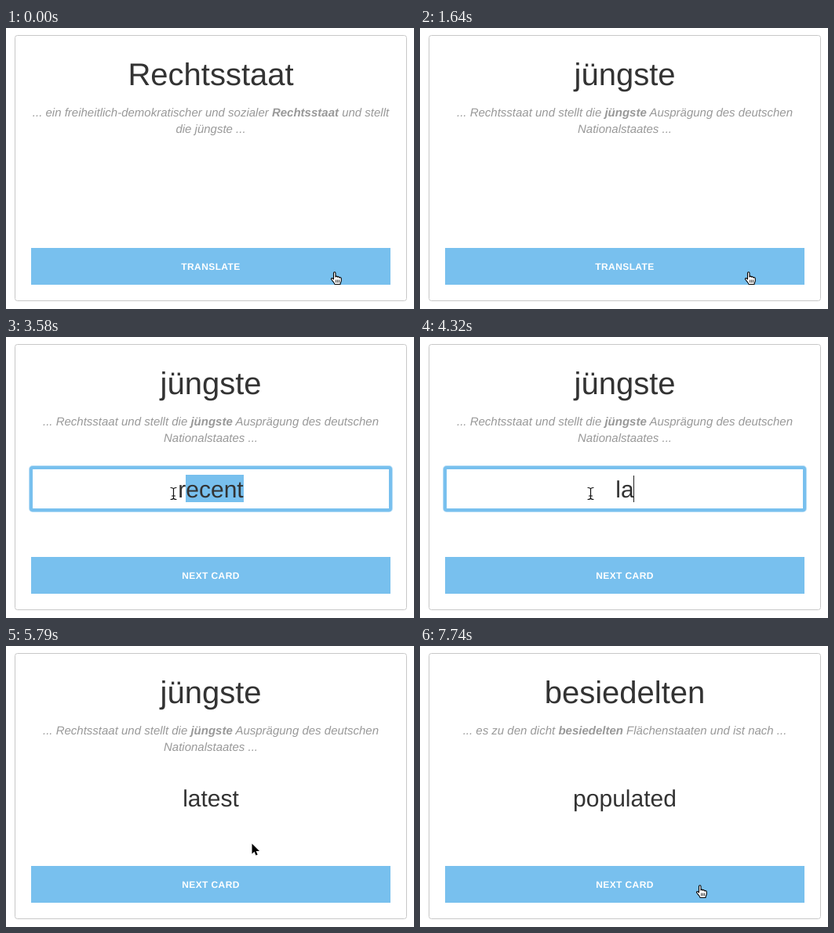
An HTML page that plays this animation: 520x359 px, repeating every 8 s.

```html
<!DOCTYPE html>
<html lang="de">
<head>
<meta charset="utf-8">
<title>Flashcards</title>
<style>
  html, body { margin: 0; width: 100%; height: 100%; overflow: hidden; background: #fff; }
  svg { display: block; width: 520px; height: 359px; }
  text { font-family: "Liberation Sans", Arial, sans-serif; text-anchor: middle; text-rendering: geometricPrecision; fill: #333; }
  #word { font-size: 40px; }
  #answer { font-size: 30px; }
  .context { font-size: 15px; font-style: italic; fill: #999; }
  .context tspan { font-weight: bold; }
  #label { font-size: 12px; font-weight: bold; letter-spacing: .4px; fill: #fff; }
  .cursor { stroke-linejoin: round; stroke-linecap: round; }
</style>
</head>
<body>
<svg viewBox="0 0 520 359">
  <rect x="11.5" y="9.5" width="499" height="339" rx="3" fill="#fff" stroke="#c8c8c8"/>
  <text id="word" x="261" y="73"></text>
  <text id="line1" class="context" x="261" y="113"></text>
  <text id="line2" class="context" x="261" y="134"></text>
  <rect id="field" x="32.5" y="167.5" width="457" height="53" fill="none" stroke="#c8c8c8"/>
  <g id="ring" fill="none" stroke="#78c0ee">
    <rect x="30" y="165" width="462" height="58" rx="4" stroke-width="2" opacity=".5"/>
    <rect x="32" y="167" width="458" height="54" rx="2" stroke-width="4"/>
  </g>
  <rect id="selection" y="176" height="35" fill="#78c0ee"/>
  <text id="answer" x="261" y="205"></text>
  <rect id="caret" y="177" width="1" height="34" fill="#222"/>
  <rect x="32" y="281" width="458" height="47" fill="#78c0ee"/>
  <text id="label" x="261" y="309"></text>
  <g id="hand" class="cursor" fill="#fff" stroke="#000" stroke-width="1.1">
    <path d="M4.5 10V2.2C4.5 .3 7 .3 7 2.2V7C7.5 5.7 9.3 5.9 9.4 7.2C10 6.2 11.8 6.5 11.8 8C12.8 7.2 14.3 7.8 14.3 9.2V11.5C14.3 13.5 13 14 13 16.5H6C5.8 14.5 3.5 12.5 1.8 10.5C.8 8.8 2.5 7.6 4.5 10Z"/>
    <path d="M7.6 11v3M9.6 11v3M11.6 11v3" stroke-width=".8"/>
  </g>
  <path id="arrow" class="cursor" d="M0 0V13L3 10.2L5 15L7.2 14L5.2 9.5H9.5Z" fill="#000" stroke="#fff" stroke-width="2" paint-order="stroke"/>
  <path id="beam" class="cursor" d="M-3.5-7.5Q0-7.5 0-5.5V5.5Q0 7.5-3.5 7.5M3.5-7.5Q0-7.5 0-5.5M0 5.5Q0 7.5 3.5 7.5M-2 3H2" fill="none" stroke="#111" stroke-width="1.2"/>
</svg>
<script>
const LOOP = 8000, CENTER = 261;
const $ = id => document.getElementById(id);
const show = (id, on) => $(id).setAttribute("visibility", on ? "visible" : "hidden");

// Each track is a list of [start time, ...values], held until the next entry.
const cards = [
  [0, "Rechtsstaat",
    "... ein freiheitlich-demokratischer und sozialer <tspan>Rechtsstaat</tspan> und stellt",
    "die jüngste ..."],
  [1640, "jüngste",
    "... Rechtsstaat und stellt die <tspan>jüngste</tspan> Ausprägung des deutschen",
    "Nationalstaates ..."],
  [6540, "besiedelten",
    "... es zu den dicht <tspan>besiedelten</tspan> Flächenstaaten und ist nach ...", ""]
];
const answers = [
  [0, ""], [600, "the legal state"], [1640, ""], [2240, "recent"],
  [4320, "la"], [4460, "late"], [4610, "lates"], [4760, "latest"],
  [6540, ""], [7740, "populated"]
];
const fieldStates = [[0, ""], [2690, "hover"], [3140, "focus"], [5200, ""]];
// index of the first selected letter, -1 for none
const selections = [[0, -1], [3288, 5], [3436, 3], [3580, 1], [3730, 0], [4320, -1]];
const pointer = [
  [0, "hand", 413, 311],
  [2540, "arrow", 398, 262], [2690, "beam", 352, 212], [2840, "beam", 338.5, 200],
  [3140, "beam", 312, 200], [3288, "beam", 294, 200], [3436, "beam", 258, 200],
  [3580, "beam", 213.5, 200], [3880, "beam", 217.5, 200],
  [5050, "beam", 246, 212], [5200, "arrow", 287, 236], [5340, "arrow", 309, 250],
  [5790, "arrow", 313.5, 252.5], [5940, "arrow", 336, 280], [6090, "hand", 351, 305]
];
const at = (track, t) => track.findLast(row => row[0] <= t).slice(1);

function draw(t) {
  const [word, line1, line2] = at(cards, t);
  $("word").textContent = word;
  $("line1").innerHTML = line1;
  $("line2").innerHTML = line2;

  const [answer] = at(answers, t), text = $("answer");
  text.textContent = answer;
  $("label").textContent = answer ? "NEXT CARD" : "TRANSLATE";

  const [state] = at(fieldStates, t), [first] = at(selections, t);
  const right = CENTER + text.getComputedTextLength() / 2;
  show("field", state === "hover");
  show("ring", state === "focus");
  show("selection", first >= 0);
  show("caret", state === "focus" && first < 0);
  $("caret").setAttribute("x", Math.floor(right));
  if (first >= 0) {
    const left = Math.round(text.getStartPositionOfChar(first).x);
    $("selection").setAttribute("x", left);
    $("selection").setAttribute("width", Math.round(right) - left);
  }

  const [shape, x, y] = at(pointer, t);
  for (const id of ["hand", "arrow", "beam"]) show(id, id === shape);
  $(shape).setAttribute("transform", `translate(${x} ${y})`);
}

const start = performance.now();
function tick() {
  draw((performance.now() - start) % LOOP);
  requestAnimationFrame(tick);
}
tick();
</script>
</body>
</html>
```
